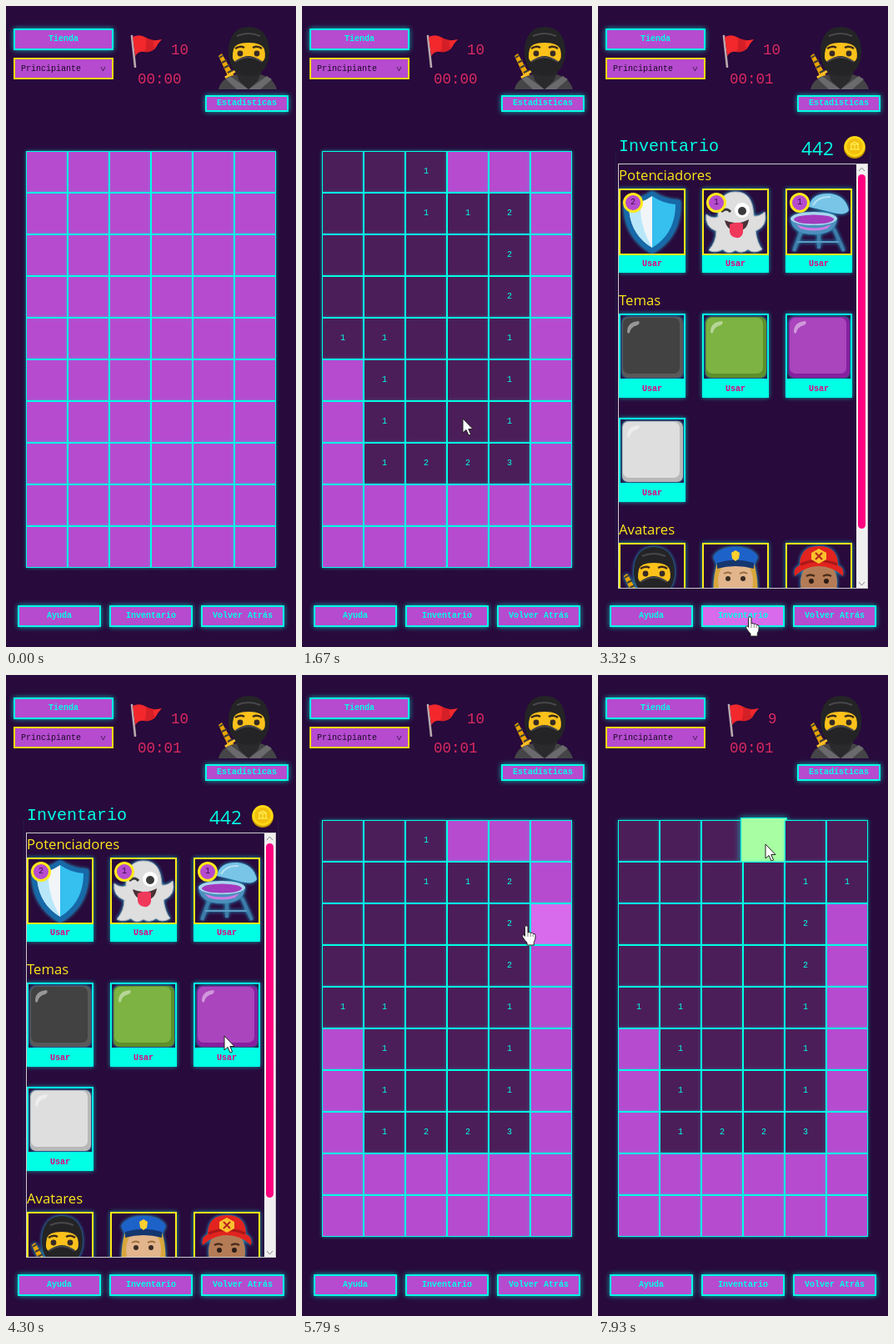
An HTML page that plays this animation: 348x769 px, repeating every 8 s.

```html
<!DOCTYPE html>
<html lang="es">
<head>
<meta charset="utf-8">
<title>Buscaminas</title>
<style>
:root { --bg: #280a3c; --fill: #b64bd0; --hot: #d76bec; --cyan: #00ffe5; --gold: #ffe81a; --pink: #ff0080; }
* { box-sizing: border-box; }
html, body { margin: 0; width: 100%; height: 100%; overflow: hidden; background: var(--bg); }
#stage { position: relative; width: 348px; height: 769px; overflow: hidden; background: var(--bg);
  font: 10px/1 "Liberation Mono", monospace; color: var(--cyan); }
#stage div, #stage svg { position: absolute; }
.mid { display: flex; align-items: center; justify-content: center; white-space: pre; }
.btn { height: 26px; border: 2px solid var(--cyan); background: var(--fill); font-weight: bold;
  box-shadow: 0 0 6px #00ffe5b0; }
.btn.hot { background: var(--hot); }
#level { left: 9px; top: 62px; width: 120px; height: 26px; border: 2px solid #ffd800; background: var(--fill);
  color: #1d0a2a; line-height: 23px; padding-left: 7px; }
.hud { color: #dc2a60; font-size: 17.5px; white-space: pre; }
.cell { width: 50px; height: 50px; border: 1px solid var(--cyan); background: var(--fill); box-shadow: 0 0 4px #00ffe590; }
.cell.open { background: #4c1e59; }
.cell.hot { background: var(--hot); }
.cell.safe { background: #a8ffa3; transform: scale(1.12); box-shadow: 0 0 7px #00ffe5b0; }
#modal { left: 0; top: 150px; width: 348px; height: 549px; }
#shade { left: 22px; top: 4px; width: 304px; height: 544px; background: var(--bg); }
#panel { left: 24px; top: 39px; width: 300px; height: 510px; border: 1px solid #ccc; overflow: hidden; }
#panel.flash { background: var(--fill); }
.sans, .head { font-family: "Open Sans", "Noto Sans", sans-serif; white-space: pre; }
.head { left: 0; color: var(--gold); font-size: 16.7px; line-height: 24px; }
.item { width: 80px; height: 101px; box-shadow: 0 0 5px #00ffe5a0; }
.frame { width: 80px; height: 80px; border: 2px solid var(--gold); }
.theme .frame { border-color: var(--cyan); }
.frame svg { left: -2px; top: -2px; width: 80px; height: 80px; filter: drop-shadow(0 0 2px #22b8e0); }
.use { top: 80px; width: 80px; height: 21px; background: var(--cyan); color: #e6007e; font-weight: bold; }
.use.hot { background: #9b3bb2; border: 1px solid #18c8c4; color: #c21b94; }
.badge { left: 5px; top: 5px; width: 24px; height: 24px; border: 3px solid var(--gold); border-radius: 50%;
  background: var(--fill); color: #3a1048; }
#bar { left: 285px; top: 0; width: 13px; height: 508px; background: #f0f0f0; }
#thumb { left: 2px; top: 12px; width: 9px; height: 425px; border-radius: 5px; background: var(--pink); }
</style>
</head>
<body>
<div id="stage">
  <svg width="0" height="0">
    <symbol id="ninja" viewBox="0 0 72 76">
      <path d="M2 36l4-3 15 27-6 4z" fill="#e9a400"/>
      <path d="M3 38l5-3M6 44l6-3M9 50l6-3M13 56l6-3" stroke="#3b3b3b" stroke-width="2"/>
      <path d="M10 62l12-8" stroke="#fbc02d" stroke-width="3"/>
      <path d="M2 76Q5 62 24 58H52Q68 62 72 76z" fill="#454547"/>
      <path d="M16 60l22 16 22-16 6 4-14 12H24L11 64z" fill="#6a6a6c"/>
      <path d="M22 54h32l-5 12-11 10-11-10z" fill="#2a2a2c"/>
      <path d="M38 1C56 1 63 15 63 31C63 48 54 60 38 60S14 48 14 31C14 15 21 1 38 1z" fill="#242426"/>
      <path d="M20 28Q22 20 38 20T57 28Q60 40 54 43Q46 36 38 36T22 43Q17 40 20 28z" fill="#fcc21b"/>
      <path d="M22 27q6-4 11-1M43 26q6-3 11 1" fill="none" stroke="#3b2a1c" stroke-width="2.5"/>
      <circle cx="28" cy="33" r="3.4" fill="#382b25"/><circle cx="48" cy="33" r="3.4" fill="#382b25"/>
      <path d="M22 43Q38 32 54 43" fill="none" stroke="#48484a" stroke-width="2"/>
      <path d="M24 12Q38 6 52 12" fill="none" stroke="#48484a" stroke-width="2"/>
    </symbol>
    <symbol id="arrow" viewBox="0 0 14 22">
      <path d="M1 1V18L5 14.5L8 21L10.6 20L7.8 13.5H13z" fill="#fff" stroke="#222" stroke-linejoin="round"/>
    </symbol>
    <symbol id="hand" viewBox="0 0 19 25">
      <path d="M4.5 2.5Q4.5 .8 6.2 .8T8 2.5V9Q10.3 7.6 11.3 9.4Q13.4 8.6 14.2 10.4Q17 9.8 17.2 12.6Q17.4 18 15.3 20.5V24H7V21Q4.5 18.6 2 14.7Q.8 12.4 2.3 11.8T4.5 13.4z" fill="#fff" stroke="#222" stroke-linejoin="round"/>
      <path d="M8 9v5M11.3 10v4M14.2 11v3" stroke="#666" stroke-width=".8"/>
    </symbol>
  </svg>

  <div id="level">Principiante</div>
  <svg style="left:112px;top:71px" width="9" height="9"><path d="M2 2l2.5 5L7 2" fill="none" stroke="#4a1c58"/></svg>
  <svg id="flag" style="top:34px" width="40" height="40">
    <path d="M2 2L6 39" stroke="#b9a9ae" stroke-width="2.6" stroke-linecap="round"/>
    <path d="M3 3Q12-1 19 4T38 6Q33 11 30 17Q24 22 17 21T6 26z" fill="#f3282d"/>
    <path d="M19 4Q20 14 17 21Q25 22 30 17Q26 10 29 7Q24 7 19 4z" fill="#d51f27"/>
  </svg>
  <div id="left" class="hud" style="top:45px"></div>
  <div id="clock" class="hud" style="left:158px;top:80px"></div>
  <svg style="left:253px;top:24px" width="72" height="76"><use href="#ninja"/></svg>
  <div id="board"></div>

  <div id="modal">
    <div id="shade"></div>
    <div style="left:25px;top:9px;font-size:20px">Inventario</div>
    <div class="sans" style="left:244px;top:5px;font-size:22.7px;line-height:31px">442</div>
    <svg style="left:294px;top:5px" width="28" height="28">
      <circle cx="14" cy="15" r="13" fill="#c99700"/><circle cx="14" cy="13.5" r="12.5" fill="#fdd817"/>
      <circle cx="14" cy="13.5" r="9.5" fill="#f2bf0c"/>
      <path d="M8 17h12M9 11h10M10 11v6M14 11v6M18 11v6M9 11l5-3 5 3" fill="none" stroke="#fde74a" stroke-width="1.5"/>
    </svg>
    <div id="panel">
      <div class="head" style="top:1px">Potenciadores</div>
      <div class="head" style="top:151px">Temas</div>
      <div class="head" style="top:426px">Avatares</div>
      <div id="bar"><div id="thumb"></div>
        <svg width="13" height="508"><path d="M3 8l3.5-4L10 8M3 501l3.5 4 3.5-4" fill="none" stroke="#888"/></svg>
      </div>
    </div>
  </div>

  <svg id="cursor" width="19" height="25"><use/></svg>
</div>
<script>
const $ = id => document.getElementById(id);
const LOOP = 8000, COLS = 6, SIZE = 50, LEFT = 24, TOP = 174;

function box(parent, cls, css, html = '') {
  const el = document.createElement('div');
  el.className = cls;
  el.style.cssText = css;
  el.innerHTML = html;
  parent.append(el);
  return el;
}

// Buttons
const targets = [];
function button(label, x, y, w, h = 26) {
  const el = box($('stage'), 'btn mid', `left:${x}px;top:${y}px;width:${w}px;height:${h}px`, label);
  $('stage').insertBefore(el, $('board'));
  targets.push({ el, x, y, w, h });
}
button('Tienda', 9, 27, 120);
button('Estadísticas', 239, 107, 100, 20);
['Ayuda', 'Inventario', 'Volver Atrás'].forEach((s, i) => button(s, 14 + 110 * i, 719, 100));

// Inventory
const pictures = {
  shield: `<path d="M40 3Q55 14 74 14Q76 58 40 78Q4 58 6 14Q25 14 40 3z" fill="#1769a8"/>
    <path d="M40 9Q27 18 12 19Q12 54 40 71z" fill="#f1f5f8"/><path d="M40 9Q53 18 68 19Q68 54 40 71z" fill="#35c0f0"/>
    <path d="M12 19Q12 54 40 71Q24 44 26 15z" fill="#b9e7fa"/>`,
  ghost: `<path d="M40 4C58 4 61 19 62 33Q69 34 75 28Q79 45 64 51Q66 66 72 73Q62 79 55 73Q47 79 40 74Q31 80 25 73Q15 78 8 74Q17 64 17 51Q3 46 5 31Q12 37 19 34C19 18 23 4 40 4z" fill="#dededf" stroke="#b5b5b8"/>
    <circle cx="48" cy="26" r="9" fill="#fff"/><circle cx="48" cy="27" r="5" fill="#3a3a3c"/>
    <path d="M23 28q6-6 11 0" fill="none" stroke="#3a3a3c" stroke-width="3"/>
    <path d="M27 38Q42 45 56 37Q54 51 42 51T27 38z" fill="#4a3236"/>
    <path d="M33 43Q41 39 49 42V53Q47 60 41 59Q34 58 33 52z" fill="#f0385b"/>`,
  grill: `<path d="M20 48L10 75M40 53V72M58 48L70 75" stroke="#3f7caa" stroke-width="4"/>
    <path d="M14 64H64" stroke="#5b9cc6" stroke-width="2"/>
    <path d="M6 35H62Q61 55 34 55T6 35z" fill="#4c8fbd"/><ellipse cx="34" cy="36" rx="28" ry="8" fill="#a9d6ee"/>
    <ellipse cx="34" cy="37" rx="24" ry="5.5" fill="#a43abd"/><path d="M13 43Q34 52 55 43L50 48Q34 53 18 48z" fill="#d17be5"/>
    <path d="M28 22Q31 5 53 6Q72 8 76 26Q72 33 57 29T28 22z" fill="#78c5e8"/>
    <path d="M33 20Q39 9 54 10" fill="none" stroke="#b5e3f5" stroke-width="2"/>`,
  ninja: '<use href="#ninja" x="4" y="4" width="72" height="76"/>',
  police: `<path d="M18 24Q9 55 18 80H62Q71 55 62 24z" fill="#d9a63c"/><ellipse cx="40" cy="46" rx="21" ry="27" fill="#e2b58c"/>
    <path d="M13 17Q20 5 40 5T67 17L62 27H18z" fill="#1d62c9"/><path d="M18 24Q40 17 62 24V31Q40 25 18 31z" fill="#15366f"/>
    <path d="M40 9l5 3-1 7-4 3-4-3-1-7z" fill="#fdd02f"/>
    <path d="M26 37q5-3 9 0M45 37q5-3 9 0" fill="none" stroke="#9a6a3c" stroke-width="2"/>
    <circle cx="31" cy="43" r="3" fill="#3b2b25"/><circle cx="49" cy="43" r="3" fill="#3b2b25"/>`,
  fire: `<ellipse cx="40" cy="48" rx="22" ry="28" fill="#b47c56"/><path d="M17 27Q17 4 40 4T63 27Q71 30 69 40Q56 28 40 28T11 40Q9 30 17 27z" fill="#e2231f"/>
    <path d="M18 26Q40 17 62 26" fill="none" stroke="#a81818" stroke-width="3"/>
    <path d="M40 7l9 5v8l-9 5-9-5v-8z" fill="#fbc02d"/><path d="M36 12l8 8M44 12l-8 8" stroke="#b3261e" stroke-width="2"/>
    <path d="M25 40q5-3 10 0M45 40q5-3 10 0" fill="none" stroke="#4a2d1c" stroke-width="2.4"/>
    <circle cx="31" cy="46" r="3" fill="#2d1d17"/><circle cx="49" cy="46" r="3" fill="#2d1d17"/>`
};
const tile = (face, edge) => `<rect x="4" y="4" width="73" height="73" rx="7" fill="${edge}"/>
  <rect x="5" y="5" width="68" height="67" rx="7" fill="${face}"/>
  <path d="M10 22Q10 10 24 9Q26 12 22 14Q14 16 13 23Q11 25 10 22z" fill="#fff" opacity=".45"/>`;

const uses = [];
function item(x, y, art, theme, count) {
  const el = box($('panel'), theme ? 'item theme' : 'item', `left:${x}px;top:${y}px`);
  box(el, 'frame', '', `<svg viewBox="0 0 80 80">${art}</svg>`);
  if (count) box(el, 'badge mid', '', count);
  uses.push({ el: box(el, 'use mid', '', 'Usar'), x: 25 + x, y: 270 + y, w: 80, h: 21 });
}
['shield', 'ghost', 'grill'].forEach((k, i) => item(100 * i, 29, pictures[k], false, i ? 1 : 2));
[['#424242', '#595959'], ['#7cb342', '#5d8f2b'], ['#aa45bd', '#8620a0']]
  .forEach((c, i) => item(100 * i, 179, tile(...c), true));
item(0, 304, tile('#dedede', '#b8b8b8'), true);
['ninja', 'police', 'fire'].forEach((k, i) => item(100 * i, 454, pictures[k]));

// Board: '#' is covered, a blank is open
const tail = '    2#    2#11  1##1  1##1  1##1223#############';
const covered = '#'.repeat(60);
const opened = '  1###  112#' + tail;
const cleared = '          11' + tail;
const cells = [...covered].map((_, i) =>
  box($('board'), 'cell mid', `left:${LEFT + i % COLS * SIZE}px;top:${TOP + Math.floor(i / COLS) * SIZE}px`));

// Mouse path: time, x, y
const path = [[430, 304, 790], [1240, 192, 499], [1330, 193, 495], [2020, 193, 495], [2830, 182, 733],
  [3500, 182, 733], [4300, 262, 433], [4340, 262, 433], [4970, 269, 301], [6310, 269, 301], [7030, 201, 203]];

function mouse(t) {
  const n = path.findIndex(p => p[0] > t);
  if (n < 0) return path[path.length - 1].slice(1);
  if (n === 0) return path[0].slice(1);
  const a = path[n - 1], b = path[n], p = (t - a[0]) / (b[0] - a[0]), e = p * p * (3 - 2 * p);
  return [a[1] + (b[1] - a[1]) * e, a[2] + (b[2] - a[2]) * e];
}
const clamp = v => Math.max(0, Math.min(1, v));
const inside = (r, x, y) => x >= r.x && x < r.x + r.w && y >= r.y && y < r.y + r.h;

function render(t) {
  const [x, y] = mouse(t);
  const alpha = Math.min(clamp((t - 3045) / 275), clamp((5790 - t) / 310));
  const shown = alpha > 0;
  const grid = t < 1670 ? covered : t < 7610 ? opened : cleared;
  const safe = t >= 1500 && t < 1670 ? 39 : t >= 7450 ? 3 : -1;
  const col = Math.floor((x + 6 - LEFT) / SIZE), row = Math.floor((y - TOP) / SIZE);
  const over = !shown && col >= 0 && col < COLS && row >= 0 && row < 10 ? row * COLS + col : -1;
  let pointer = false;

  cells.forEach((el, i) => {
    const open = grid[i] !== '#';
    const hot = !open && i === over && i !== safe;
    pointer = pointer || hot;
    el.className = 'cell mid' + (open ? ' open' : '') + (hot ? ' hot' : '') + (i === safe ? ' safe' : '');
    el.textContent = open ? grid[i].trim() : '';
  });
  const mark = (r, active) => {
    const hot = active && inside(r, x, y);
    r.el.classList.toggle('hot', hot);
    pointer = pointer || hot;
  };
  targets.forEach(r => mark(r, true));
  uses.forEach(r => mark(r, shown));

  const one = t >= 7610;
  $('flag').style.left = (one ? 155 : 149) + 'px';
  $('left').style.left = (one ? 204 : 198) + 'px';
  $('left').textContent = one ? '9' : '10';
  $('clock').textContent = t < 2580 ? '00:00' : '00:01';
  $('modal').style.opacity = alpha;
  $('modal').style.visibility = shown ? 'visible' : 'hidden';
  $('panel').classList.toggle('flash', t >= 5390);

  $('cursor').style.transform = `translate(${x - (pointer ? 6 : 1)}px, ${y - 1}px)`;
  const use = $('cursor').firstElementChild;
  use.setAttribute('href', pointer ? '#hand' : '#arrow');
  use.setAttribute('width', pointer ? 19 : 14);
  use.setAttribute('height', pointer ? 25 : 22);
}

function tick() {
  render(performance.now() % LOOP);
  requestAnimationFrame(tick);
}
tick();
</script>
</body>
</html>
```
